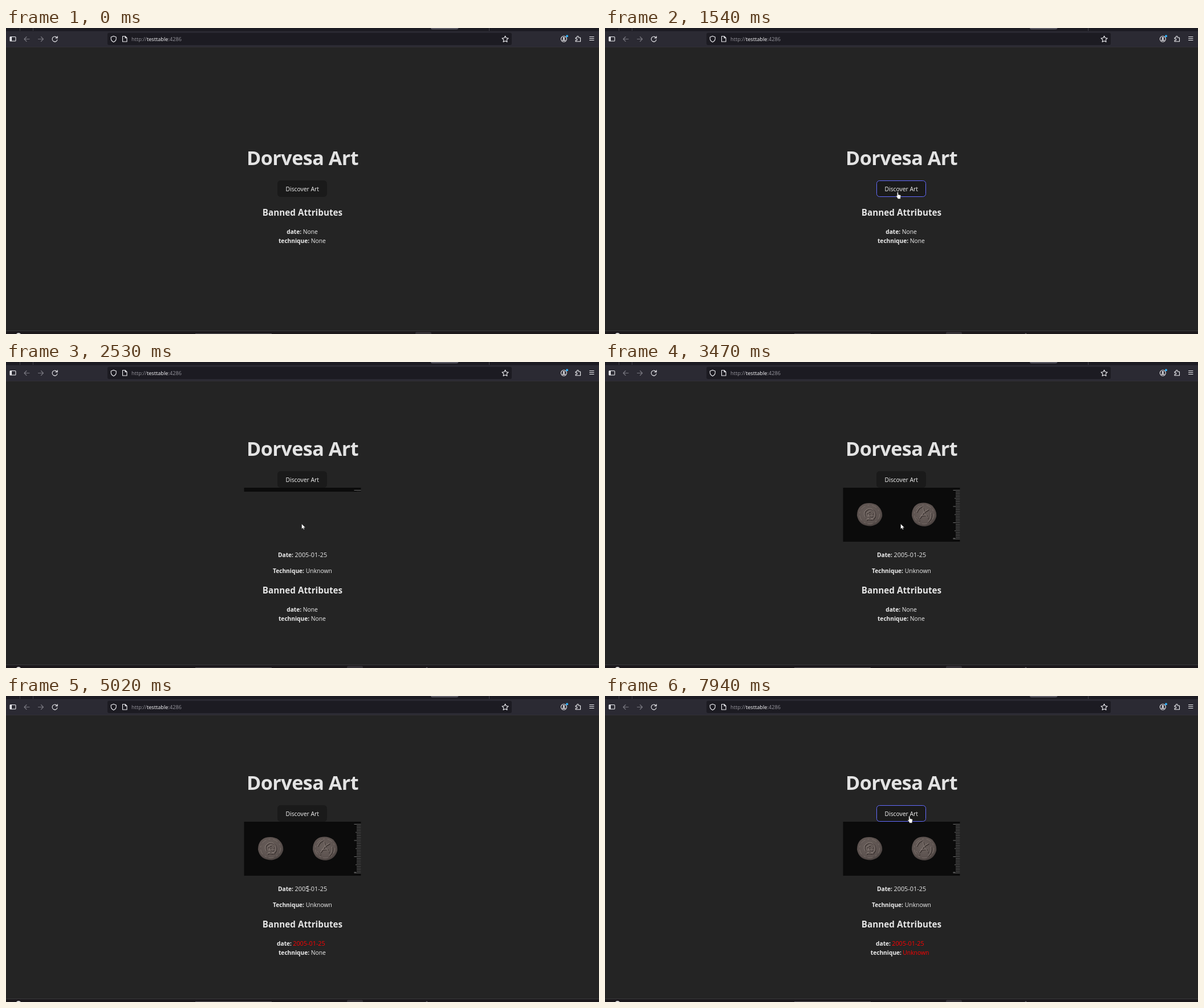
These frames come from a looping animation (1040x538 px, 8000 ms). An HTML page:

```html
<!DOCTYPE html>
<html lang="en">
<head>
<meta charset="utf-8">
<title>Art discovery</title>
<style>
  html, body { margin: 0; width: 100%; height: 100%; overflow: hidden; background: #242424; }
  svg { display: block; width: 1040px; height: 538px; font-family: "Open Sans", "Noto Sans", sans-serif; }
  text { fill: #ededed; font-size: 10.35px; }
  .label { font-weight: 700; font-size: 10.2px; text-anchor: end; }
  .mid { text-anchor: middle; }
  .h1 { font-weight: 700; font-size: 34.2px; letter-spacing: -.55px; fill: #e3e3e3; }
  .h2 { font-weight: 700; font-size: 15.25px; fill: #e6e6e6; }
  .date { font-size: 10.85px; }
  .banned { fill: #f00; }
  .url { font-size: 9.2px; fill: #96959d; }
  .icon { fill: none; stroke: #f0f0f4; stroke-width: 1.1; stroke-linecap: round; stroke-linejoin: round; }
  .faint { stroke: #797881; }
</style>
</head>
<body>
<svg viewBox="0 0 1040 538">
  <defs>
    <radialGradient id="metal" cx=".45" cy=".42" r=".6">
      <stop offset="0" stop-color="#6a605c"/>
      <stop offset=".75" stop-color="#5c524f"/>
      <stop offset="1" stop-color="#473f3d"/>
    </radialGradient>
    <clipPath id="loaded"><rect id="loadedArea" x="417" y="221" width="206" height="95"/></clipPath>
  </defs>
  <rect width="1040" height="538" fill="#242424"/>

  <g id="toolbar">
    <rect width="1040" height="6" fill="#1c1b22"/>
    <path d="M24.5 0V5M47.5 0V5M847.5 0V5" stroke="#414049"/>
    <path d="M745 0H793.500Q793 2.500 790 2.500H748Q745 2.500 745 0Z" fill="#56555f"/>
    <rect y="5.500" width="1040" height="27.500" fill="#2b2a33"/>
    <rect y="33" width="1040" height="1" fill="#313036"/>
    <rect x="178" y="8.500" width="709" height="21.500" rx="3" fill="#1c1b22"/>
    <g class="icon">
      <rect x="7" y="15.500" width="10" height="7.500" rx="1"/>
      <path d="M8 16H9.500V22.500H8Z" fill="#f0f0f4"/>
      <path class="faint" d="M41 19.500H32.500M36 15.500L32 19.500L36 23.500M56.500 19.500H65M61.500 15.500L65.500 19.500L61.500 23.500"/>
      <path d="M89.500 17.300A4.500 4.500 0 1 0 90 20.500M90.200 14.500V17.700H87"/>
      <path d="M188.700 14.200L193.200 16V18.500Q193.200 22.600 188.700 24.700Q184.200 22.600 184.200 18.500V16Z"/>
      <path d="M204.500 14.500H209L212 17.500V24H204.500ZM209 14.500V17.500H212"/>
      <path d="M875.500 14L877.200 17.500L881 18L878.200 20.700L878.900 24.500L875.500 22.700L872.100 24.500L872.800 20.700L870 18L873.800 17.500Z"/>
      <circle cx="978.300" cy="19.300" r="5"/>
      <circle cx="978.300" cy="17.700" r="1.200" fill="#f0f0f4"/>
      <path d="M975.800 21.800Q978.300 19.300 980.800 21.800Z" fill="#f0f0f4"/>
      <path d="M999 17H1001.300V15.800Q1001.300 14.300 1002.800 14.300T1004.300 15.800V17H1007.500V23.700H999V21.800H1000.500Q1001.800 21.800 1001.800 20.400T1000.500 19H999Z"/>
      <path d="M1023.500 15.500H1031M1023.500 18.500H1031M1023.500 21.500H1031"/>
    </g>
    <circle cx="984" cy="14.300" r="2" fill="#2fb3ff"/>
    <text class="url" x="220" y="23.300">http://<tspan fill="#fbfbfe">testtable</tspan>:4286</text>
  </g>

  <g id="taskbar">
    <rect y="532" width="1040" height="6" fill="#1c191c"/>
    <rect y="532" width="1040" height="1" fill="#38373a"/>
    <circle cx="22" cy="541" r="5" fill="#ddd"/>
    <rect x="332" y="537" width="134" height="1" fill="#57545a"/>
    <rect id="activeTask" y="534.500" width="28" height="5" rx="2" fill="#363338"/>
    <circle id="taskDot" cx="738" cy="538" r="1.500" fill="#6a676c"/>
  </g>

  <g id="header">
    <text class="h1 mid" x="520" y="241">Dorvesa Art</text>
    <rect id="button" x="476.500" y="268.500" width="86" height="28" rx="5" fill="#1a1a1a"/>
    <text class="mid" x="519.700" y="287.200" font-weight="500" style="fill:#f6f6f6">Discover Art</text>
  </g>

  <g id="photo" clip-path="url(#loaded)">
    <rect x="417.500" y="221" width="205" height="95" fill="#0b0b0b"/>
    <g id="coins"></g>
    <path id="ruler" stroke="#8b8b8b" stroke-width=".8"/>
    <path d="M610.500 310H614" stroke="#777"/>
  </g>

  <g id="details">
    <text class="label" x="504" y="302">Date:</text>
    <text class="date" x="506.500" y="302">2005-01-25</text>
    <text class="label" x="523" y="329.500">Technique:</text>
    <text x="525.800" y="329.500">Unknown</text>
  </g>

  <g id="bans">
    <text class="h2 mid" x="520" y="330">Banned Attributes</text>
    <g id="dateNone">
      <text class="label" x="518.200" y="361.500">date:</text>
      <text x="520.700" y="361.500">None</text>
    </g>
    <g id="dateBanned">
      <text class="label" x="501" y="361.500">date:</text>
      <text class="date banned" x="503.200" y="361.500">2005-01-25</text>
    </g>
    <g id="techNone">
      <text class="label" x="532.200" y="377.800">technique:</text>
      <text x="534.700" y="377.800">None</text>
    </g>
    <g id="techBanned">
      <text class="label" x="520" y="377.800">technique:</text>
      <text class="banned" x="522.300" y="377.800">Unknown</text>
    </g>
  </g>

  <g id="pointer">
    <circle id="click" r="8.300" fill="#ff0" fill-opacity=".62"/>
    <path id="arrow" d="M0 0V9.200L2.100 7.300L3.500 10.300L5 9.600L3.700 6.700H6.700Z" fill="#fff" stroke="#111" stroke-width=".5"/>
    <path id="hand" d="M-1.100 .8Q0 -.6 1.100 .8V4.500L4.500 5.300Q5.800 5.600 5.600 7L5 10.500V12.300H-.2V11L-3 7.200Q-2.600 5.800 -1.100 7.200Z" fill="#fff" stroke="#111" stroke-width=".6"/>
    <path id="beam" d="M-1.800 -4.500H1.800M0 -4.500V4.500M-1.800 4.500H1.800" stroke="#c8c8c8" stroke-width=".9"/>
  </g>
</svg>
<script>
const LOOP = 8000, STEP = 69;
const $ = id => document.getElementById(id);
const show = (id, on) => $(id).setAttribute("display", on ? "inline" : "none");
const shift = (id, x, y) => $(id).setAttribute("transform", `translate(${x} ${y})`);

// Each move: start, end, then the points it runs between.
const moves = [
  [180, 940, [985, 520], [512, 290]],
  [1000, 1070, [512, 290], [513.3, 288.3]],
  [1600, 2200, [513.3, 288.3], [519, 284]],
  [2300, 2300, [519, 284], [518.5, 284.5]],
  [3470, 4230, [518.5, 284.5], [538, 342]],
  [4280, 4750, [538, 342], [529.5, 339]],
  [5570, 5915, [529.5, 339], [541, 392]],
  [5915, 6260, [541, 392], [545.5, 369.5]],
  [7330, 7800, [545.5, 369.5], [533.8, 211]]
];
const clicks = [[1470, 1540], [4950, 5020], [6930, 7060], [7800, 7940]];

function pointerAt(t) {
  const move = moves.filter(m => t >= m[0]).pop();
  if (!move) return null;
  const [start, end, from, to] = move;
  let k = 1;
  if (t < end) {
    const held = Math.floor((t - start) / STEP) * STEP / (end - start);
    k = move === moves[0] ? 1 - (1 - held) ** 2 : held * held * (3 - 2 * held);
  }
  return from.map((v, i) => v + (to[i] - v) * k);
}

function coin(cx, cy, rx, ry, relief) {
  return `<g transform="translate(${cx} ${cy})">
    <path d="M${-rx} 2Q${-rx} ${-ry * .7} ${-rx * .4} ${-ry * .93}Q${rx * .2} ${-ry * 1.08} ${rx * .65} ${-ry * .75}
      Q${rx * 1.08} ${-ry * .3} ${rx} ${ry * .2}Q${rx * .8} ${ry * .9} ${rx * .1} ${ry}Q${-rx * .85} ${ry} ${-rx} 2Z" fill="url(#metal)"/>
    <ellipse rx="${rx * .8}" ry="${ry * .8}" fill="none" stroke="#81756f" stroke-width=".8" stroke-dasharray="9 4 3 5"/>
    <path d="${relief}" fill="none" stroke="#39312f" stroke-width="1.600" transform="translate(1 1)"/>
    <path d="${relief}" fill="none" stroke="#938782" stroke-width=".9"/></g>`;
}

$("coins").innerHTML =
  coin(464, 268, 22, 20.5, "M-9 -4Q-3 -13 5 -9Q11 -5 9 4Q5 11 -3 8Q-10 6 -9 -4M-5 -2L1 -6L6 -1M-4 3H5M-1 -3V5M-6 10L0 6L7 9") +
  coin(559.5, 268, 21.5, 21, "M-2 -12L0 -4L8 -9M0 -4L-8 7M0 -4L7 7M-6 2L5 1M-13 -4Q-10 -12 -4 -14M12 -3Q14 7 7 13M-13 5L-8 11");

$("ruler").setAttribute("d", Array.from({ length: 31 }, (_, i) => {
  const length = i % 10 === 0 ? 12 : i % 5 === 0 ? 9.5 : 7.5;
  return `M622.5 ${225.5 + i * 2.85}h${-length}`;
}).join(""));

function render(t) {
  const answered = t >= 1900, pictured = t >= 2530;
  const lift = pictured ? -76 : answered ? -35 : 0;
  shift("header", 0, lift);
  shift("bans", 0, pictured ? 77 : answered ? 35.7 : 0);
  shift("details", 0, pictured ? 41 : 0);
  show("details", answered);
  show("photo", pictured);
  $("loadedArea").setAttribute("height", t < 2670 ? 7 : t < 2750 ? 52 : 95);

  const dateBanned = t >= 5020, techBanned = t >= 7060;
  show("dateNone", !dateBanned);
  show("dateBanned", dateBanned);
  show("techNone", !techBanned);
  show("techBanned", techBanned);

  const focused = t >= 1470;
  $("activeTask").setAttribute("x", focused ? 598 : 718);
  show("taskDot", focused);

  const point = pointerAt(t);
  show("pointer", point);
  let hover = false;
  if (point) {
    const [x, y] = point;
    const buttonY = y - lift;
    hover = x > 476 && x < 563 && buttonY > 268 && buttonY < 297;
    const overText = pictured && [339.5, 367, 401].some(line => Math.abs(y - line) < 9);
    shift("pointer", x, y);
    show("hand", hover);
    show("beam", !hover && overText);
    show("arrow", !hover && !overText);
    show("click", clicks.some(([from, to]) => t >= from && t < to));
  }
  $("button").setAttribute("stroke", hover ? "#646cff" : "#1a1a1a");
}

function tick(now) {
  render(now % LOOP);
  requestAnimationFrame(tick);
}
render(0);
requestAnimationFrame(tick);
</script>
</body>
</html>
```
